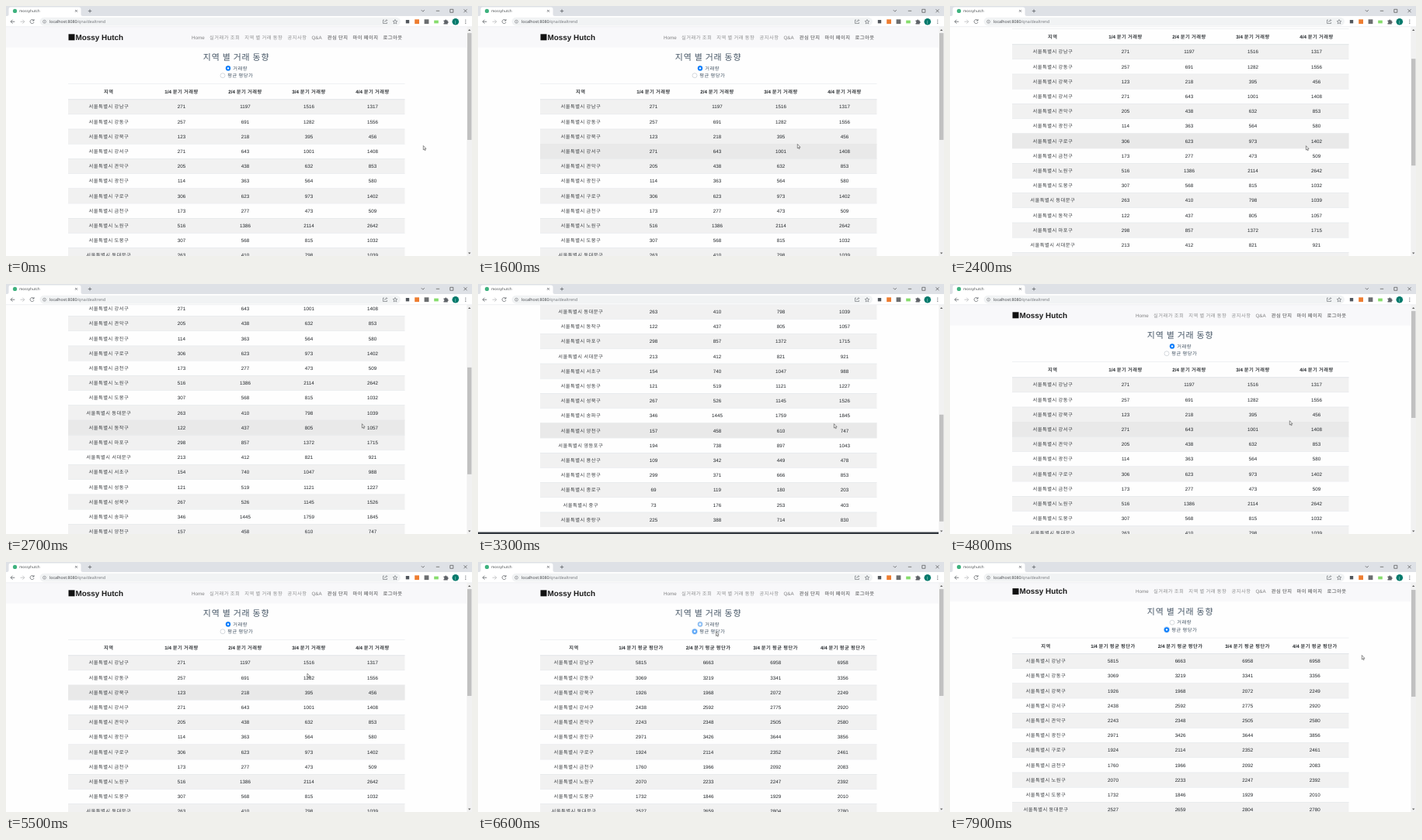
An HTML page that plays this animation: 600x323 px, repeating every 8 s.

```html
<!DOCTYPE html>
<html lang="ko">
<head>
<meta charset="utf-8">
<title>mossyhutch</title>
<style>
html, body { margin: 0; width: 100%; height: 100%; overflow: hidden; background: #fefefe; }
svg { display: block; width: 600px; height: 323px; }
text {
  font-family: "Liberation Sans", "Noto Sans CJK KR", "Noto Sans CJK JP", sans-serif;
  white-space: pre; text-rendering: geometricPrecision;
}
.ko { letter-spacing: .08em; fill-opacity: .87; }
.ui { font-family: "Open Sans", sans-serif; }
.icon { fill: none; stroke: #5f6368; stroke-width: .8; }
</style>
</head>
<body>
<svg id="stage" viewBox="0 0 600 323"></svg>
<script>
const LOOP = 8000, CLICK = 6510, HOVER_LAG = 150;
const TOP = 120.4, ROW = 19.2, LEFT = 80, RIGHT = 513.5;

const volume = `강남 271 1197 1516 1317
강동 257 691 1282 1556
강북 123 218 395 456
강서 271 643 1001 1408
관악 205 438 632 853
광진 114 363 564 580
구로 306 623 973 1402
금천 173 277 473 509
노원 516 1386 2114 2642
도봉 307 568 815 1032
동대문 263 410 798 1039
동작 122 437 805 1057
마포 298 857 1372 1715
서대문 213 412 821 921
서초 154 740 1047 988
성동 121 519 1121 1227
성북 267 526 1145 1526
송파 346 1445 1759 1845
양천 157 458 610 747
영등포 194 738 897 1043
용산 109 342 449 478
은평 299 371 666 853
종로 69 119 180 203
중 73 176 253 403
중랑 225 388 714 830`;

const price = `강남 5815 6663 6958 6958
강동 3069 3219 3341 3356
강북 1926 1968 2072 2249
강서 2438 2592 2775 2920
관악 2243 2348 2505 2580
광진 2971 3426 3644 3856
구로 1924 2114 2352 2461
금천 1760 1966 2092 2083
노원 2070 2233 2247 2392
도봉 1732 1846 1929 2010
동대문 2527 2659 2804 2780`;

// Hangul is spaced so that each syllable is one em wide.
const hangul = s => s.replace(/[가-힣]+/g, '<tspan class="ko">$&</tspan>');
const text = (x, y, s, o = {}) => {
  const { size = 6.25, fill = '#212529', anchor = 'start', bold, cls = '' } = o;
  return `<text class="${cls}" x="${x}" y="${y + size * .36}" font-size="${size}" fill="${fill}"
    text-anchor="${anchor}" font-weight="${bold ? 700 : 400}">${hangul(s)}</text>`;
};
const mid = (x, y, s, o) => text(x, y, s, { ...o, anchor: 'middle' });
const rect = (x, y, w, h, fill, extra = '') =>
  `<rect x="${x}" y="${y}" width="${w}" height="${h}" fill="${fill}" ${extra}/>`;
const circle = (x, y, r, fill, extra = '') =>
  `<circle cx="${x}" cy="${y}" r="${r}" fill="${fill}" ${extra}/>`;
const icon = (d, extra = '') => `<path class="icon" d="${d}" ${extra}/>`;

function table(id, data, label, first, rest, step) {
  const col = i => i ? rest + (i - 1) * step : first;
  const cells = (names, y, o) => names.map((s, i) => mid(col(i), y, s, o)).join('');
  const heads = ['지역', ...[1, 2, 3, 4].map(q => `${q}/4 분기 ${label}`)];
  const body = data.split('\n').map((line, i) => {
    const [name, ...values] = line.split(' ');
    return cells([`서울특별시 ${name}구`, ...values], TOP + (i + .5) * ROW + .2);
  }).join('');
  return `<g id="${id}">${cells(heads, 110.6, { bold: true })}${body}</g>`;
}

function stripes() {
  let s = rect(LEFT, 100, RIGHT - LEFT, .5, '#dee2e6');
  for (let i = 0; i < 25; i++) {
    const y = TOP + i * ROW;
    if (i % 2 == 0) s += rect(LEFT, y, RIGHT - LEFT, ROW, '#f1f1f1');
    s += rect(LEFT, y, RIGHT - LEFT, i ? .5 : .8, '#dee2e6');
  }
  return s;
}

const radio = (id, x, y, ring = 0) => circle(x, y, 3, '#fff', 'stroke="#adb5bd" stroke-width=".5"') +
  `<g id="${id}">${circle(x, y, 3.1 + ring, '#007bff', 'opacity=".25"')}
  ${circle(x, y, 3.1, '#007bff')}${circle(x, y, 1.2, '#fff')}</g>`;

function nav() {
  const links = [[239, 'Home'], [262, '실거래가 조회'], [307.3, '지역 별 거래 동향'], [362.5, '공지사항'],
    [393.5, 'Q&amp;A'], [413.7, '관심 단지', 1], [446.4, '마이 페이지', 1], [485.5, '로그아웃', 1]];
  return rect(0, 27, 593, 26.6, '#f8f8fa') + rect(80.5, 36.3, 8, 8, '#111') +
    text(89.6, 40.1, 'Mossy Hutch', { size: 9.9, bold: true, fill: '#1b1b1b' }) +
    links.map(([x, s, bold]) => text(x, 40.5, s, { bold, fill: bold ? '#6c6d6e' : '#808182' })).join('');
}

function page() {
  const ink = { fill: '#2c3e50' };
  return nav() + mid(296.6, 65.9, '지역 별 거래 동향', { ...ink, size: 10.94 }) +
    radio('optVolume', 286, 80.4) + text(292.2, 80.3, '거래량', ink) +
    radio('optPrice', 279, 89.8, 1.1) + text(285.3, 90, '평균 평당가', ink) +
    stripes() + rect(LEFT, 0, RIGHT - LEFT, ROW, '#e9e9e9', 'id="hover"') +
    table('volume', volume, '거래량', 132.3, 226, 82) +
    table('price', price, '평균 평단가', 123.4, 210, 86.6) +
    rect(0, 607, 593, 24.5, '#343a40') +
    mid(296.6, 615, '© Copyright <tspan font-weight="700">NOLVE</tspan>. All Rights Reserved', { fill: '#fff' }) +
    mid(296.6, 624, 'Designed by 6반 8조', { fill: '#fff' });
}

function browser() {
  const dark = '#3c4043';
  return rect(0, 0, 600, 13, '#dee1e6') +
    '<path d="M1 13q2.500 0 2.500-2.500V4q0-2.500 2.500-2.500H94q2.500 0 2.500 2.500V10.500q0 2.500 2.500 2.500z" fill="#fff"/>' +
    circle(11.5, 6.4, 2.6, '#3fb27f') +
    text(17, 6.4, 'mossyhutch', { size: 4.7, cls: 'ui', fill: dark }) +
    icon('M89 5l2.800 2.800m0-2.800l-2.800 2.800M105.800 6.500h4.400m-2.200-2.200v4.400') +
    icon('M534.800 5.200l2 2 2-2M553.800 6.300h4.400M571.800 4.300h4v4h-4zM589.500 4.300l4 4m0-4l-4 4', 'style="stroke:#333;stroke-width:.6"') +
    rect(0, 13, 600, 14, '#fff') + rect(0, 26.6, 600, .5, '#dfe1e5') +
    rect(43.5, 14.8, 464.5, 10.6, '#f1f3f4', 'rx="5.3"') +
    icon('M11.300 20.200H6m2.500-2.500L6 20.200l2.500 2.500') +
    icon('M18.500 20.200h5.300m-2.500-2.500l2.500 2.500-2.500 2.500', 'style="stroke:#babcbe"') +
    icon('M35.600 18.600a2.500 2.500 0 1 0 .4 2.200M36 17v2h-2') +
    circle(49.5, 20.2, 2, 'none', 'stroke="#5f6368" stroke-width=".5"') +
    icon('M49.500 20v1.200m0-2.300v.5', 'style="stroke-width:.5"') +
    text(56, 20.3, 'localhost:8080<tspan fill="#6f7377">/qna/dealtrend</tspan>', { size: 5.25, cls: 'ui', fill: '#3a3d41' }) +
    icon('M487 18h-1.500v4.500h5V21M487.500 21q0-2.500 3-2.500m-1-1.300l1.300 1.300-1.300 1.300', 'style="stroke-width:.6"') +
    icon('M501 17.500l.8 1.900 2 .2-1.500 1.300.5 2-1.800-1.100-1.800 1.100.5-2-1.500-1.300 2-.2z', 'style="stroke-width:.6"') +
    rect(514.8, 18, 4.4, 4.4, '#51565c') + rect(526.2, 17.3, 5.8, 5.8, '#ee7d31') +
    rect(538.6, 17.3, 5.8, 5.8, '#6c6e70') + rect(551.2, 18.6, 5.6, 3.8, '#86dd6c') +
    '<path d="M563.500 18.400h1.700a1 1 0 0 1 2 0h1.500v1.700a1 1 0 0 1 0 2v1.500h-5.200v-1.700a.9 .9 0 0 0 0-1.800z" fill="#5f6368"/>' +
    circle(578.8, 20.3, 4.3, '#00796b') + mid(578.8, 20.4, 'J', { size: 4.5, cls: 'ui', fill: '#fff' }) +
    [18.2, 20.3, 22.4].map(y => circle(591.8, y, .6, '#5f6368')).join('') +
    rect(593.3, 27, 6.7, 296, '#f1f1f1') + rect(594, 0, 5.4, 138, '#c1c1c1', 'id="thumb"') +
    '<path d="M595 32l1.700-2 1.700 2zM595 318.500l1.700 2 1.700-2z" fill="#606060"/>';
}

const stage = document.getElementById('stage');
stage.innerHTML = `<g id="page">${page()}</g>${browser()}
  <path id="cursor" d="M0 0V5.300L1.200 4.300 2 6.100 2.900 5.700 2.100 3.900H3.700Z" fill="#fff" stroke="#222" stroke-width=".5"/>`;
const part = id => document.getElementById(id);

const ease = u => u * u * (3 - 2 * u);
// Keys are [time, ...values].
function track(keys, t, shape = u => u) {
  const i = keys.findIndex(k => k[0] > t);
  if (i < 0) return keys[keys.length - 1].slice(1);
  if (!i) return keys[0].slice(1);
  const a = keys[i - 1], b = keys[i], u = shape((t - a[0]) / (b[0] - a[0]));
  return a.slice(1).map((v, j) => v + (b[j + 1] - v) * u);
}

const pointer = [[0, 537.3, 180.5], [500, 537.3, 180.5], [1500, 411.3, 178.5], [1700, 411.3, 178.5],
  [2100, 458.4, 180.7], [4500, 458.4, 180.7], [4800, 437.3, 176.7], [5000, 437.3, 176.7],
  [6200, 306.5, 90.2], [6700, 306.5, 90.2], [7700, 530.3, 120.5]];
const scrolling = [[2150, 0], [2700, 155.7], [3400, 308], [4150, 308], [4720, 0],
  [7800, 0], [7900, 2.2], [8000, 8]];

function draw(t) {
  const [x, y] = track(pointer, t, ease);
  const [hoverX, hoverY] = track(pointer, t - HOVER_LAG, ease);
  const [scroll] = track(scrolling, t);
  const mix = Math.min(1, Math.max(0, (t - CLICK) / 150));
  const row = Math.floor((hoverY + scroll - TOP) / ROW);
  const over = hoverX > LEFT && hoverX < RIGHT && row >= 0 && row < 25;

  part('page').setAttribute('transform', `translate(0 ${-scroll})`);
  part('thumb').setAttribute('y', 35 + scroll * .467);
  part('cursor').setAttribute('transform', `translate(${x} ${y})`);
  part('hover').setAttribute('y', TOP + row * ROW);
  part('hover').setAttribute('opacity', over ? 1 : 0);
  part('optVolume').setAttribute('opacity', 1 - mix);
  part('optPrice').setAttribute('opacity', mix);
  part('volume').setAttribute('display', t < CLICK ? 'inline' : 'none');
  part('price').setAttribute('display', t < CLICK ? 'none' : 'inline');
}

const start = performance.now();
function tick() {
  draw((performance.now() - start) % LOOP);
  requestAnimationFrame(tick);
}
tick();
</script>
</body>
</html>
```
